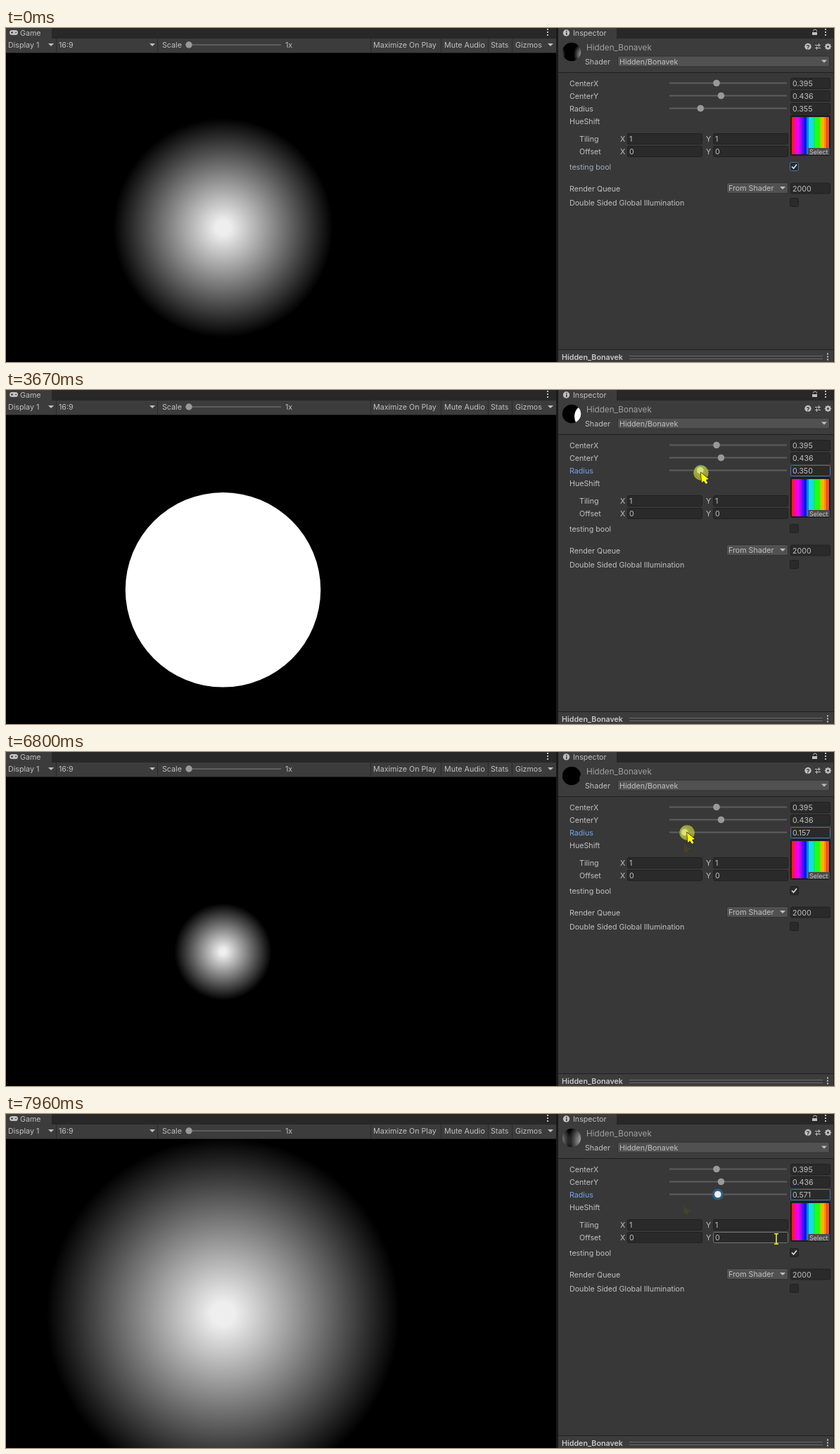
An HTML page with a canvas for the animation above (8000 ms loop, 1177x476 px).

```html
<!DOCTYPE html>
<html lang="en">
<head>
<meta charset="utf-8">
<title>Shader inspector</title>
<style>
  html, body { margin: 0; width: 100%; height: 100%; overflow: hidden; background: #000; }
  canvas { display: block; width: 1177px; height: 476px; }
</style>
</head>
<body>
<canvas id="stage" width="1177" height="476"></canvas>
<script>
const ctx = document.getElementById('stage').getContext('2d');
const LOOP = 8000;
const NAME = 'Bonavek';
const TEXT = '#c0c0c0', BLUE = '#3a79bb', LABEL_BLUE = '#74a6ec';

// Keyframes: time, then values
const CURSOR = [
  [200, 762, 6], [960, 1090, 199], [1030, 1091, 198], [1650, 1122, 199], [2180, 1122, 199],
  [2520, 1081, 197], [2920, 1081, 197], [3530, 989, 117], [3670, 988, 118], [4080, 970, 118],
  [4360, 963.5, 119], [4560, 963.5, 119], [5270, 1124, 200], [5780, 1124, 200],
  [6250, 963, 131], [6470, 965, 115], [6680, 965, 115], [6800, 968, 115], [7070, 1002, 118],
  [7340, 1009, 118], [7480, 1013, 118], [7550, 1013, 119], [7960, 1095, 178]
];
const RADIUS = [
  [3600, .355], [3740, .346], [3910, .258], [4080, .187], [4360, .132], [6680, .132],
  [6800, .156], [7070, .475], [7340, .53], [7480, .571]
];
const PRESSES = [[1850, 1980], [3600, 4560], [5390, 5520], [6600, 7520]];

function track(keys, t) {
  if (t <= keys[0][0]) return keys[0].slice(1);
  const next = keys.findIndex(k => k[0] > t);
  if (next < 0) return keys[keys.length - 1].slice(1);
  const a = keys[next - 1], b = keys[next];
  const p = (t - a[0]) / (b[0] - a[0]);
  return a.slice(1).map((v, i) => v + (b[i + 1] - v) * p);
}

function rect(x, y, w, h, color) {
  ctx.fillStyle = color;
  ctx.fillRect(x, y, w, h);
}

function disc(x, y, r, color) {
  ctx.fillStyle = color;
  ctx.beginPath();
  ctx.arc(x, y, r, 0, Math.PI * 2);
  ctx.fill();
}

function poly(points, fill, stroke) {
  ctx.beginPath();
  points.forEach(([x, y]) => ctx.lineTo(x, y));
  ctx.closePath();
  if (stroke) { ctx.strokeStyle = stroke; ctx.lineWidth = 1.4; ctx.stroke(); }
  ctx.fillStyle = fill;
  ctx.fill();
}

function label(str, x, middle, color = TEXT, size = 10.7, weight = 400) {
  ctx.font = `${weight} ${size}px Inter, sans-serif`;
  ctx.fillStyle = color;
  ctx.fillText(str, x, middle + 4);
}

function box(x, y, w, h, fill, border) {
  ctx.beginPath();
  ctx.roundRect(x + .5, y + .5, w - 1, h - 1, 2);
  ctx.fillStyle = fill;
  ctx.fill();
  ctx.strokeStyle = border;
  ctx.lineWidth = 1;
  ctx.stroke();
}

function field(x, middle, w, value, border = '#202020') {
  box(x, middle - 8, w, 16, '#2a2a2a', border);
  label(value, x + 3, middle);
}

function arrowDown(x, y) {
  poly([[x - 4, y - 2], [x + 4, y - 2], [x, y + 2]], TEXT);
}

function dropdown(x, middle, w, str) {
  box(x, middle - 8, w, 16, '#515151', '#303030');
  label(str, x + 3, middle);
  arrowDown(x + w - 8, middle);
}

function dots(x, y) {
  for (let i = -1; i < 2; i++) rect(x - 1, y + i * 4 - 1, 2, 2, TEXT);
}

function checkbox(middle, checked, border) {
  box(1114, middle - 7, 13, 13, '#2a2a2a', border);
  if (!checked) return;
  ctx.strokeStyle = '#e4e4e4';
  ctx.lineWidth = 1.6;
  ctx.beginPath();
  ctx.moveTo(1117, middle - .5);
  ctx.lineTo(1119.5, middle + 2);
  ctx.lineTo(1124, middle - 3.5);
  ctx.stroke();
}

function slider(name, middle, x, value, focused) {
  label(name, 801, middle, focused ? LABEL_BLUE : TEXT);
  rect(943, middle - 1.5, 167, 2, '#5e5e5e');
  if (focused) disc(x, middle - .5, 8, '#2c5d87');
  disc(x, middle - .5, 4.8, focused ? '#eeeeee' : '#999');
  field(1115, middle, 57, value.toFixed(3), focused ? BLUE : undefined);
}

function glow(r) {
  const g = ctx.createRadialGradient(0, 0, 0, 0, 0, r);
  g.addColorStop(0, '#efefef');
  g.addColorStop(.065, '#eeeeee');
  g.addColorStop(1, '#000');
  return g;
}

function gameView(radius, soft) {
  rect(0, 36, 782, 440, '#000');
  ctx.save();
  ctx.beginPath();
  ctx.rect(0, 36, 782, 440);
  ctx.clip();
  ctx.translate(308.5, 284.8);
  const r = radius * 440;
  disc(0, 0, soft ? r : r * .9, soft ? glow(r) : '#fff');
  ctx.restore();
}

function gameChrome() {
  rect(0, 0, 782, 15, '#282828');
  rect(0, 0, 65, 15, '#3c3c3c');
  rect(0, 15, 782, 20, '#3c3c3c');
  rect(0, 35, 782, 1, '#1c1c1c');
  rect(782, 0, 3, 476, '#1a1a1a');

  ctx.fillStyle = TEXT;
  ctx.beginPath();
  ctx.roundRect(5, 3, 12, 7, 3.5);
  ctx.fill();
  rect(7, 6, 3, 1, '#3c3c3c');
  rect(8, 5, 1, 3, '#3c3c3c');
  rect(13, 6, 2, 1, '#3c3c3c');

  label('Game', 20, 7);
  dots(770, 6);
  [71, 215, 518, 618, 685, 719].forEach(x => rect(x, 15, 1, 20, '#2a2a2a'));
  label('Display 1', 3, 24);
  arrowDown(64, 24);
  label('16:9', 75, 24);
  arrowDown(208, 24);
  label('Scale', 222, 24);
  rect(260, 23, 131, 2, '#5e5e5e');
  disc(260, 24, 4.7, '#999');
  label('1x', 397, 24);
  label('Maximize On Play', 522, 24);
  label('Mute Audio', 623, 24);
  label('Stats', 689, 24);
  label('Gizmos', 724, 24);
  arrowDown(774, 24);
}

function previewBall(radius, soft) {
  ctx.save();
  ctx.beginPath();
  ctx.arc(804, 34, 13.2, 0, Math.PI * 2);
  ctx.clip();
  rect(790, 20, 28, 28, '#000');
  ctx.globalCompositeOperation = 'lighter';
  const scale = radius * (soft ? 1.1 : 1);
  for (const x of soft ? [820, 782] : [820]) {
    ctx.save();
    ctx.globalAlpha = soft ? .75 : 1;
    ctx.translate(x, 38);
    ctx.scale(34 * scale, 44 * scale);
    disc(0, 0, 1, soft ? glow(1) : '#fff');
    ctx.restore();
  }
  ctx.restore();
}

function headerIcons() {
  disc(1140, 26.5, 4.7, TEXT);
  label('?', 1137.4, 26.5, '#383838', 9, 700);
  rect(1150, 24, 8, 1, TEXT);
  rect(1150, 28, 8, 1, TEXT);
  rect(1155, 22, 1, 5, TEXT);
  rect(1152, 26, 1, 5, TEXT);
  for (let i = 0; i < 8; i++) {
    const a = i * Math.PI / 4;
    disc(1168.5 + Math.cos(a) * 3.7, 26.5 + Math.sin(a) * 3.7, 1.1, TEXT);
  }
  disc(1168.5, 26.5, 3.6, TEXT);
  disc(1168.5, 26.5, 1.5, '#383838');
}

function inspectorChrome() {
  rect(785, 0, 392, 476, '#383838');
  rect(785, 0, 392, 15, '#282828');
  rect(785, 0, 83, 15, '#3c3c3c');
  rect(785, 15, 392, 48, '#3c3c3c');
  rect(785, 63, 392, 1, '#1f1f1f');
  disc(796.5, 7, 4.7, TEXT);
  rect(796, 4, 1.5, 1.5, '#333');
  rect(796, 6.5, 1.5, 3.5, '#333');
  label('Inspector', 806, 7);

  rect(1146, 6, 7, 4, TEXT);
  ctx.strokeStyle = TEXT;
  ctx.lineWidth = 1;
  ctx.beginPath();
  ctx.arc(1150, 4.5, 2.5, Math.PI, Math.PI * 2.1);
  ctx.stroke();
  dots(1165, 6);

  label('Hidden_' + NAME, 825, 27.5, '#a0a0a0', 11.7);
  label('Shader', 823, 48);
  dropdown(869, 47.5, 302, 'Hidden/' + NAME);
  headerIcons();

  rect(785, 458, 392, 1, '#1f1f1f');
  rect(785, 459, 392, 17, '#3c3c3c');
  label('Hidden_' + NAME, 790, 469, '#c8c8c8', 10.7, 600);
  rect(886, 467, 275, 1, '#686868');
  rect(886, 471, 275, 1, '#686868');
  dots(1168, 468.5);
  rect(1176, 0, 1, 476, '#222');
}

function hueTexture() {
  box(1115, 124, 57, 58, '#202020', '#191919');
  const bands = [
    [1117, '#ff1c1c'], [1121, '#ff00b4'], [1123, '#f000f0'], [1128, '#b400f5'],
    [1131, '#5a10f0'], [1134, '#1414f5'], [1138, '#1478f0'], [1141, '#14dce6'],
    [1148, '#0ae678'], [1150, '#1eff14'], [1157, '#78f000'], [1159, '#ffb400'],
    [1163, '#ff8c00'], [1166, '#ff3214'], [1168, '#f08214'], [1169, '#ff1c1c'], [1170]
  ];
  for (let i = 0; i < bands.length - 1; i++) {
    rect(bands[i][0], 127, bands[i + 1][0] - bands[i][0], 53, bands[i][1]);
  }
  rect(1140, 171, 31, 10, '#4c4c4c');
  label('Select', 1142, 176, '#c8c8c8', 9);
}

const inside = ([x, y], left, top, w, h) => x >= left && x < left + w && y >= top && y < top + h;

function properties(radius, checked, radiusFocus, cursor) {
  slider('CenterX', 79, 1010, .395);
  slider('CenterY', 97, 1016.5, .436);
  slider('Radius', 115, 947 + 113.5 * radius, radius, radiusFocus);
  label('HueShift', 801, 133);

  let overField = false;
  [['Tiling', 158, '1'], ['Offset', 176, '0']].forEach(([name, y, value]) => {
    label(name, 815, y);
    [['X', 873, 883], ['Y', 995, 1005]].forEach(([axis, labelX, x]) => {
      const hover = cursor && inside(cursor, x, y - 8, 107, 16);
      overField = overField || hover;
      label(axis, labelX, y);
      field(x, y, 107, value, hover ? '#777' : undefined);
    });
  });
  hueTexture();

  const hoverBox = cursor && inside(cursor, 1114, 191, 13, 13);
  const border = !radiusFocus ? (checked ? BLUE : '#4d6570') : hoverBox ? '#68685c' : '#202020';
  label('testing bool', 801, 198, radiusFocus ? TEXT : '#a0adbb');
  checkbox(198, checked, border);

  label('Render Queue', 801, 228.5);
  dropdown(1024, 228, 88, 'From Shader');
  field(1115, 228.5, 57, '2000');
  label('Double Sided Global Illumination', 801, 248.5);
  checkbox(249, false, '#202020');
  return overField;
}

const ARROW = [[0, 0], [1, 14], [4, 11.5], [7, 16], [9.5, 14.5], [7, 10], [11, 9]];

function pointer([x, y], fill, outline) {
  poly(ARROW.map(([dx, dy]) => [x + dx, y + dy]), fill, outline);
}

function textBeam([x, y]) {
  rect(x - .8, y - 7, 1.6, 14, '#f0f020');
  rect(x - 3, y - 8, 6, 1.5, '#f0f020');
  rect(x - 3, y + 6.5, 6, 1.5, '#f0f020');
}

function draw(t) {
  const [radius] = track(RADIUS, t);
  const checked = t < 1980 || t >= 5520;
  const radiusFocus = (t >= 3600 && t < 5390) || t >= 6600;
  const cursor = t < 200 ? null : track(CURSOR, t);

  gameView(radius, checked);
  gameChrome();
  inspectorChrome();
  previewBall(radius, checked);
  const overField = properties(radius, checked, radiusFocus, cursor);

  // Faint trail left under the slider
  if (t >= 6470) poly([[963, 131], [968, 135], [974, 138], [969, 140], [970, 144], [964, 142]], '#45412a');
  if (!cursor) return;
  if (PRESSES.some(([from, to]) => t >= from && t < to)) {
    disc(cursor[0], cursor[1], 10.7, t > 7000 ? 'rgba(215,215,155,.65)' : 'rgba(215,215,50,.65)');
  }
  if (overField) textBeam(cursor);
  else pointer(cursor, t > 7000 && t < 7520 ? '#ffffd0' : '#ffff00', '#242418');
}

const start = performance.now();
function tick() {
  draw((performance.now() - start) % LOOP);
  requestAnimationFrame(tick);
}
tick();
</script>
</body>
</html>
```
